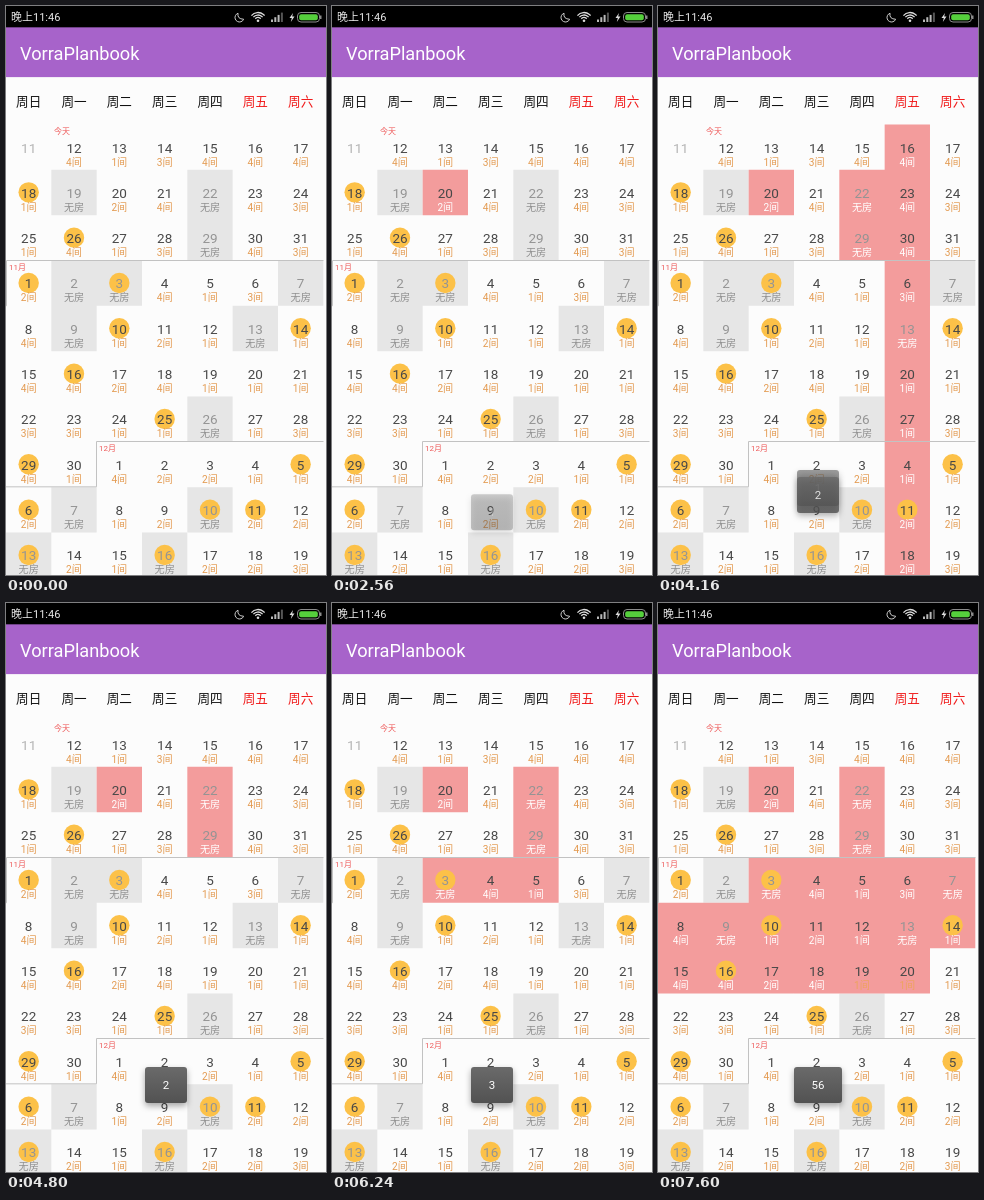
These frames come from a looping animation (320 by 569 pixels, 8000 ms). An HTML page with a canvas:

```html
<!DOCTYPE html>
<html lang="zh-CN">
<head>
<meta charset="utf-8">
<title>Room calendar</title>
<style>
html, body { margin: 0; width: 100%; height: 100%; overflow: hidden; background: #fcfcfc; }
canvas { display: block; width: 320px; height: 569px; }
</style>
</head>
<body>
<canvas id="stage"></canvas>
<script>
const W = 320, H = 569, LOOP = 8000;
const STATUS = 21.33, BAR = 71.11;
const CELL = 45.33, TOP = 118.5, RIGHT = 317.5;
const FONT = "Roboto, 'Noto Sans CJK SC', 'Noto Sans CJK JP', sans-serif";
const RED = '#f39c9c', GREY = '#e6e6e6', LINE = '#c2c2c2';

// Free rooms per day from 11 October; x = sold out, - = past
const ROOMS = '-413444' + '1x24x43' + '1413x43' + '2xx413x' + '4x121x1' +
              '4424111' + '3311x13' + '4142211' + '2x12x22' + 'x21x223';
const MARKED = new Set([7, 15, 21, 23, 30, 34, 36, 45, 49, 55, 56, 60, 61, 63, 66]);
const TAPS = [[9, 2240], [11, 2800], [18, 3200]];
const DRAG_START = 23;
const DRAG = [[6000, 23], [6160, 24], [6240, 25], [6400, 26], [6480, 32], [6560, 33], [6720, 40]];
const TOASTS = [
  { text: '1', show: 2490, hide: 4020 },
  { text: '2', show: 3936, hide: 5540 },
  { text: '3', show: 5600, hide: 7110 },
  { text: '56', show: 7150, hide: LOOP }
];

const canvas = document.getElementById('stage');
const ctx = canvas.getContext('2d');
const dpr = window.devicePixelRatio || 1;
canvas.width = W * dpr;
canvas.height = H * dpr;

const clamp = v => Math.max(0, Math.min(1, v));
const cellX = i => i % 7 * CELL;
const cellY = i => TOP + Math.floor(i / 7) * CELL;

function rect(x, y, w, h, color) {
  ctx.fillStyle = color;
  ctx.fillRect(x, y, w, h);
}

function text(str, x, y, size, color, align = 'center', weight = 400) {
  ctx.font = `${weight} ${size}px ${FONT}`;
  ctx.textAlign = align;
  ctx.fillStyle = color;
  ctx.fillText(str, x, y);
}

function path(points, close) {
  ctx.beginPath();
  points.forEach(([x, y]) => ctx.lineTo(x, y));
  if (close) ctx.closePath();
}

function disc(x, y, r, color) {
  ctx.fillStyle = color;
  ctx.beginPath();
  ctx.arc(x, y, r, 0, Math.PI * 2);
  ctx.fill();
}

function box(x, y, w, h, r) {
  ctx.beginPath();
  ctx.roundRect(x, y, w, h, r);
}

function drawStatus() {
  rect(0, 0, W, STATUS, '#000');
  text('晚上11:46', 5, 15, 11, '#e8e8e8', 'left');

  ctx.strokeStyle = '#ccc';
  ctx.lineWidth = 1;
  ctx.beginPath();
  ctx.arc(233.5, 11.5, 4.5, -1.9, 0.4, true);
  ctx.quadraticCurveTo(231, 13, 232, 7.2);
  ctx.stroke();

  ctx.strokeStyle = '#ddd';
  ctx.lineWidth = 1.3;
  for (const r of [3.5, 6, 8.5]) {
    ctx.beginPath();
    ctx.arc(252, 15, r, -Math.PI * 0.78, -Math.PI * 0.22);
    ctx.stroke();
  }
  disc(252, 14.8, 1.3, '#ddd');

  for (let i = 0; i < 4; i++) {
    const h = 2.5 + i * 2.3;
    rect(265 + i * 3.3, 16 - h, 2, h, i < 3 ? '#b8b8b8' : '#555');
  }

  path([[287, 7], [283.5, 12], [285.8, 12], [284.8, 16], [288.5, 10.6], [286.2, 10.6]], true);
  ctx.fillStyle = '#ddd';
  ctx.fill();

  ctx.strokeStyle = '#8c8c8c';
  ctx.lineWidth = 1;
  box(291.5, 6.5, 22, 9.5, 3.5);
  ctx.stroke();
  rect(314, 9.5, 1.5, 3.5, '#8c8c8c');
  box(293.2, 8.2, 18.6, 6.1, 2);
  ctx.fillStyle = '#55cf3c';
  ctx.fill();
}

function drawHeader() {
  rect(0, 0, W, BAR, '#a763ca');
  text('VorraPlanbook', 14, 54.1, 18.2, '#fff', 'left');
  [...'日一二三四五六'].forEach((d, c) =>
    text('周' + d, (c + 0.5) * CELL, 100.1, 12.6, c > 4 ? '#f01818' : '#111', 'center', 500));
}

function isPicked(i, t) {
  if (TAPS.some(([cell, at]) => cell === i && t >= at)) return true;
  if (i % 7 === 5 && t >= 3840 && t < 4720) return true;
  const step = DRAG.filter(([at]) => t >= at).pop();
  return !!step && i >= DRAG_START && i <= step[1];
}

// One path per colour keeps shared cell edges seamless
function fillCells(cells, color) {
  ctx.beginPath();
  cells.forEach(i => ctx.rect(cellX(i), cellY(i), CELL, CELL));
  ctx.fillStyle = color;
  ctx.fill();
}

function roomColor(i, t, picked, soldOut) {
  if (i === 9 && t >= 1280 && t < 2240) return '#fcfcfc';
  if (picked && t >= 6720 && (i === 39 || i === 40)) return '#eda35e';
  if (picked) return '#fff';
  return soldOut ? '#8e8e8e' : '#e39a50';
}

function drawCell(i, t) {
  const mid = cellX(i) + CELL / 2, y = cellY(i);
  const day = new Date(2015, 9, 11 + i).getDate();
  const rooms = ROOMS[i], soldOut = rooms === 'x', past = rooms === '-';

  if (MARKED.has(i)) disc(mid, y + 22.5, 10.2, '#fcc148');
  text(day, mid, y + 28, 13.5, past ? '#b4b4b4' : soldOut ? '#949494' : '#484848');
  if (!past) {
    text(soldOut ? '无房' : rooms + '间', mid, y + 41, 10.1,
      roomColor(i, t, isPicked(i, t), soldOut));
  }
}

function drawMonth(i, label) {
  const x = Math.floor(cellX(i)) + 0.5;
  const y = Math.floor(cellY(i)) + 0.5;
  ctx.strokeStyle = LINE;
  ctx.lineWidth = 1;
  path([[RIGHT, y], [x, y], [x, y + CELL], [0, y + CELL]]);
  ctx.stroke();
  text(label, x + 2.5, y + 9, 8, '#ee5b5b', 'left');
}

function drawGrid(t) {
  const cells = [...ROOMS].map((_, i) => i);
  fillCells(cells.filter(i => ROOMS[i] === 'x' && !isPicked(i, t)), GREY);
  fillCells(cells.filter(i => isPicked(i, t)), RED);
  cells.forEach(i => drawCell(i, t));
  drawMonth(21, '11月');
  drawMonth(51, '12月');
  text('今天', 48, 128, 8, '#ee5b5b', 'left');
}

function drawToast({ text: label, show, hide }, t) {
  if (t < show || t > hide + 400) return;
  const rise = 1 - (1 - clamp((t - show) / 400)) ** 2;
  const y = 500 - 36 * rise;
  const w = label.length > 1 ? 48 : 42, x = 160 - w / 2;

  ctx.save();
  ctx.globalAlpha = rise * (1 - clamp((t - hide) / 400));
  const fill = ctx.createLinearGradient(0, y, 0, y + 36);
  fill.addColorStop(0, '#6a6a6a');
  fill.addColorStop(1, '#525252');
  ctx.save();
  ctx.shadowColor = 'rgba(0,0,0,.35)';
  ctx.shadowBlur = 6 * dpr;
  ctx.shadowOffsetY = 3 * dpr;
  ctx.fillStyle = fill;
  box(x, y, w, 36, 3);
  ctx.fill();
  ctx.restore();
  text(label, 160, y + 22, 11.5, '#fff');
  ctx.restore();
}

function draw(t) {
  ctx.setTransform(dpr, 0, 0, dpr, 0, 0);
  rect(0, 0, W, H, '#fcfcfc');
  drawGrid(t);
  drawHeader();
  drawStatus();
  TOASTS.forEach(toast => drawToast(toast, t));
}

const start = performance.now();
function tick() {
  draw((performance.now() - start) % LOOP);
  requestAnimationFrame(tick);
}
tick();
</script>
</body>
</html>
```
